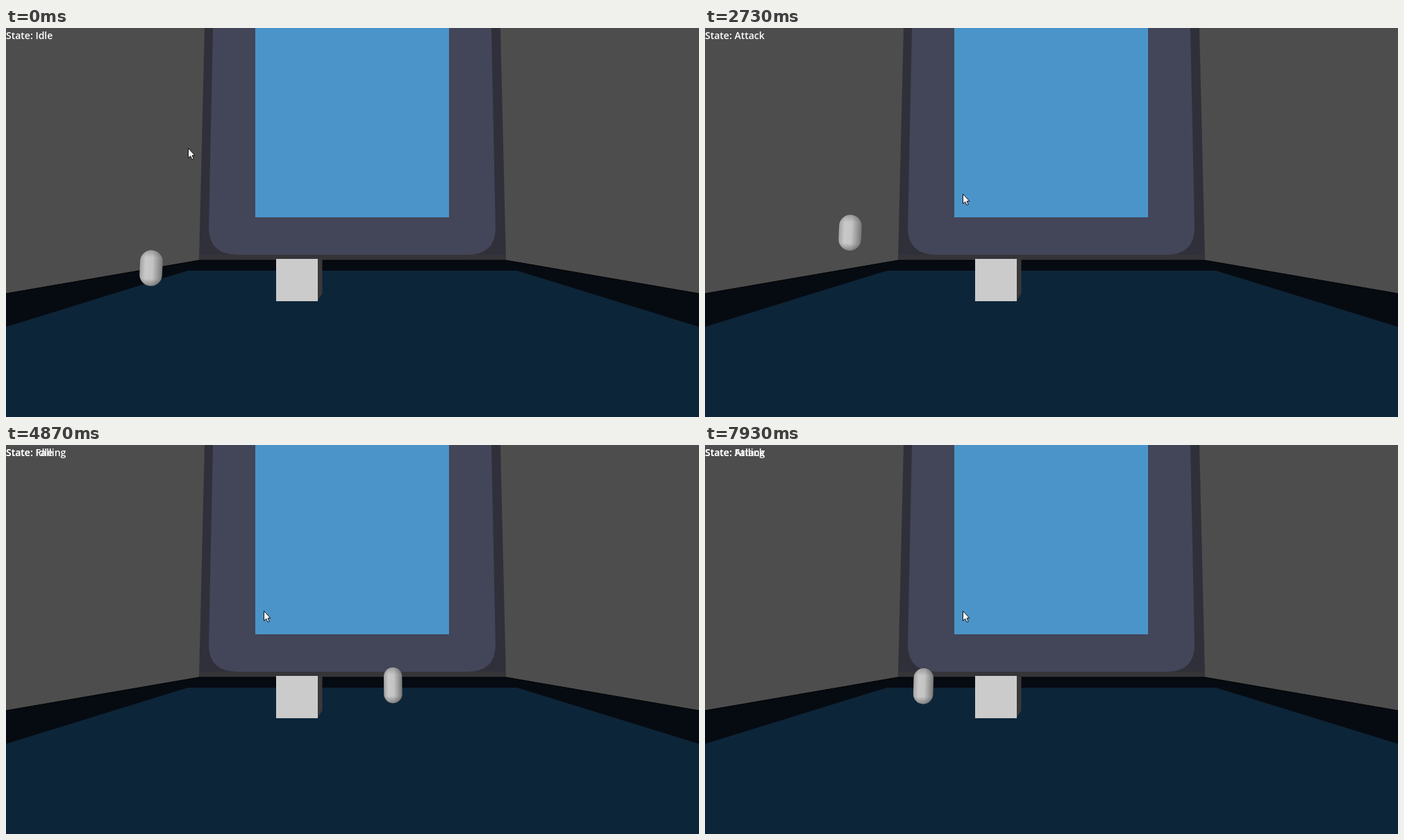
An HTML page for the animation above (8000 ms loop, 998 px wide and 561 px high).

```html
<!DOCTYPE html>
<html lang="en">
<head>
<meta charset="utf-8">
<title>Character states</title>
<style>
  html, body { margin: 0; width: 100%; height: 100%; overflow: hidden; background: #4d4d4d; }
  svg { display: block; width: 100vw; height: 100vh; }
  text { font: 600 14px "Open Sans", "Noto Sans", sans-serif; fill: #fff; }
</style>
</head>
<body>
<svg viewBox="0 0 998 561">
  <defs>
    <linearGradient id="side">
      <stop offset="0" stop-color="#a2a2a2"/>
      <stop offset=".25" stop-color="#c9c9c9"/>
      <stop offset=".55" stop-color="#c4c4c4"/>
      <stop offset="1" stop-color="#777"/>
    </linearGradient>
    <linearGradient id="under" x2="0" y2="1">
      <stop offset="0" stop-color="#333" stop-opacity=".3"/>
      <stop offset=".2" stop-color="#333" stop-opacity="0"/>
      <stop offset=".8" stop-color="#333" stop-opacity="0"/>
      <stop offset="1" stop-color="#333" stop-opacity=".45"/>
    </linearGradient>
  </defs>
  <rect width="998" height="561" fill="#4d4d4d"/>

  <!-- wall -->
  <path d="M286 0H712L720 335H278Z" fill="#2f3039"/>
  <path d="M279 327H719L720 335H278Z" fill="#353539"/>
  <path d="M298 0H699L705 288Q705 327 664 327H334Q292 327 292 288Z" fill="#434559"/>
  <rect x="359" y="-6" width="279" height="279" fill="#4b94c9"/>

  <!-- floor -->
  <path d="M278 335H720L998 383V561H0V383Z" fill="#060b12"/>
  <path d="M0 383L278 335H720L998 383" fill="none" stroke="#000"/>
  <path d="M262 350H736L998 431V561H0V431Z" fill="#0d2538"/>

  <g id="capsule">
    <rect id="body" fill="url(#side)"/>
    <rect id="shade" fill="url(#under)"/>
  </g>

  <!-- crate -->
  <path d="M448 333L455.500 334V383L448 394Z" fill="#3a3838"/>
  <rect x="389" y="333" width="60" height="61" fill="#cbcbcb"/>

  <path id="cursor" d="M.5 .5V14.500L3.700 11.600L6 16.500L8.200 15.500L6 10.800H10Z" fill="#fff" stroke="#111"/>
  <text id="previous" y="16"></text>
  <text id="state" y="16"></text>
</svg>
<script>
const LOOP = 8000, STEP = LOOP / 120, GROUND = 322, HEIGHT = 51.5;
const $ = id => document.getElementById(id);

const bob = (t, period = 985) => 10.5 * (1 - Math.cos(2 * Math.PI * t / period));
const jump = (t, from = 0) => Math.max(0, from + .449 * t - .000463 * t * t);

// Height above the ground: [end time, rule]
const heights = [
  [1880, t => bob(t - 85)],
  [2910, t => jump(t - 1880, 6.6)],
  [3400, t => bob(t - 2910)],
  [3880, t => Math.max(9, bob(t - 2910))],
  [4869, t => jump(t - 3880, 9)],
  [5212, t => bob(t - 4869)],
  [6217, t => jump(t - 5212, 16.5)],
  [6872, t => bob(t - 6217, 655)],
  [LOOP, t => jump(t - 6872)]
];

const states = [
  [0, "Idle"], [1933, "Falling"], [2400, "Attack"], [2933, "Idle"],
  [3133, "Running"], [3933, "Falling"], [4867, "Idle"], [5200, "Falling"],
  [6267, "Attack"], [6867, "Falling"], [7933, "Attack"]
];

const runX = [[0, 209], [3140, 209], [4870, 558], [5090, 558], [6000, 433], [6890, 315], [LOOP, 314.5]];
const cursorX = [[0, 262], [930, 262], [1730, 371], [LOOP, 371]];
const cursorY = [[0, 173], [930, 173], [1730, 237], [1870, 237], [1940, 239], [LOOP, 239]];

function track(keys, t) {
  const i = Math.max(1, keys.findIndex(k => k[0] > t));
  const [t0, a] = keys[i - 1], [t1, b] = keys[i];
  return a + (b - a) * (t - t0) / (t1 - t0);
}

function setAttributes(el, values) {
  for (const name in values) el.setAttribute(name, values[name]);
}

function drawCapsule(t) {
  const x = track(runX, t);
  const y = GROUND - heights.find(h => t < h[0])[1](t);
  const offset = (x - 495) / 286;
  const width = 26 + 6.5 * offset * offset;
  const box = { x: x - width / 2, y, width, height: HEIGHT, rx: width / 2, ry: width / 2 };
  setAttributes($("body"), box);
  setAttributes($("shade"), box);
  $("capsule").setAttribute("transform", `rotate(${-2.5 * offset} ${x} ${y + HEIGHT / 2})`);
}

// The old label lingers for one step when the state changes.
function drawState(step) {
  const startStep = s => Math.round(s[0] / STEP);
  const i = states.findLastIndex(s => startStep(s) <= step);
  const changing = i > 0 && startStep(states[i]) === step;
  $("state").textContent = "State: " + states[i][1];
  $("previous").textContent = changing ? "State: " + states[i - 1][1] : "";
}

function render() {
  const step = Math.floor((performance.now() % LOOP + 4) / STEP) % 120;
  const t = step * STEP;
  drawCapsule(t);
  drawState(step);
  $("cursor").setAttribute("transform", `translate(${track(cursorX, t)} ${track(cursorY, t)})`);
  requestAnimationFrame(render);
}
render();
</script>
</body>
</html>
```
